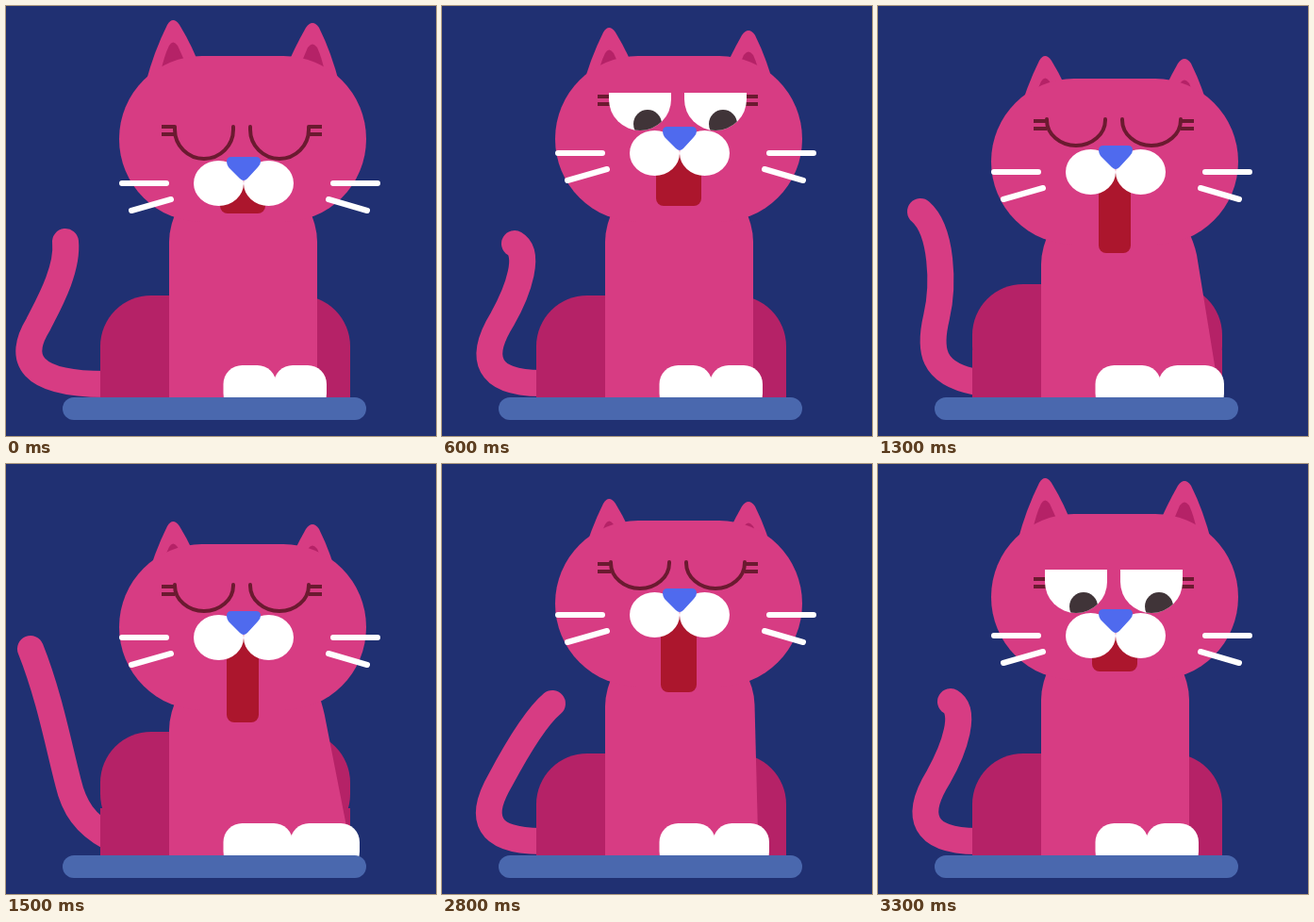
Write an HTML page without scripts that moves like this. It is 456 px wide and 456 px high and loops after 3400 ms.

```html
<!DOCTYPE html>
<html lang="en">
<head>
<meta charset="utf-8">
<title>Yawning cat</title>
<style>
  @property --ear   { syntax: "<length>"; inherits: true; initial-value: 0px; }
  @property --head  { syntax: "<length>"; inherits: true; initial-value: 0px; }
  @property --face  { syntax: "<length>"; inherits: true; initial-value: 0px; }
  @property --body  { syntax: "<length>"; inherits: true; initial-value: 0px; }
  @property --jaw   { syntax: "<length>"; inherits: true; initial-value: 30px; }
  @property --mouth { syntax: "<length>"; inherits: true; initial-value: 24px; }
  @property --paw   { syntax: "<length>"; inherits: true; initial-value: 55px; }
  @property --lash  { syntax: "<length>"; inherits: true; initial-value: 0px; }
  @property --lid   { syntax: "<length>"; inherits: true; initial-value: 0px; }

  html, body { margin: 0; height: 100%; overflow: hidden; background: #203072; }
  svg { display: block; width: 100vw; height: 100vh; }

  svg, .tail, .torso, .open, .shut, .shut path {
    animation: 3.4s step-end infinite;
  }
  svg { animation-name: pose; }
  .tail { animation-name: tail; }
  .torso { animation-name: torso; }
  .open { animation-name: open; }
  .shut { animation-name: shut; }
  .shut path { animation-name: squeeze; }

  .pink { fill: #d73c83; }
  .dark { fill: #b52267; }
  .white { fill: #fff; }
  .line { fill: none; stroke: #6b1a30; stroke-width: 4; }
  .whiskers { fill: none; stroke: #fff; stroke-width: 6; stroke-linecap: round; }
  .tail {
    --curl: path("M77 252C94 262 82 300 64 332C38 374 48 400 105 400");
    fill: none; stroke: #d73c83; stroke-width: 28; stroke-linecap: round;
  }
  .torso { --upright: path("M173 430V250Q173 232 184 210H319Q330 232 330 250L330 430Z"); }

  .ears { transform: translateY(var(--ear)); }
  .head { transform: translateY(var(--head)); }
  .face { transform: translateY(var(--face)); }
  .body { transform: translateY(var(--body)); }
  .lashes { transform: translateY(var(--lash)); }
  .lid { height: var(--lid); }
  .mouth { x: calc(251px - var(--mouth)); width: calc(2 * var(--mouth)); height: var(--jaw); }
  .paw { width: calc(var(--paw) + 1px); }
  .paw + .paw { x: calc(229px + var(--paw)); }

  /* the yawn plays forward, holds, then runs back */
  @keyframes pose {
    11.76%, 97.05% { --ear: 0px; --face: -6px; --jaw: 36px; --lid: 0px; }
    14.7%, 94.11% { --ear: 4px; --face: -19px; --jaw: 45px; --lid: 3px; }
    17.64% {
      --ear: 8px; --head: 0px; --face: -32px; --jaw: 54px; --mouth: 24px;
      --paw: 55px; --lash: 0px; --lid: 7px; animation-timing-function: steps(3);
    }
    26.47% {
      --ear: 22px; --head: 7px; --face: -28px; --jaw: 80px; --mouth: 19px;
      --paw: 58.5px; --lash: 6px; --lid: 46px; --body: 0px;
    }
    32.35%, 79.41% { --ear: 30px; --head: 15px; --face: -20px; --jaw: 82px; --mouth: 18px; --paw: 63.5px; --body: -4px; }
    38.23%, 73.52% { --ear: 38px; --head: 24px; --face: -12px; --jaw: 84px; --mouth: 17px; --paw: 68.5px; --body: -12px; }
    44.11% { --ear: 46px; --head: 32px; --face: -4px; --jaw: 88px; --mouth: 17px; --paw: 72.5px; --body: -23px; }
    82.35% {
      --ear: 22px; --head: 7px; --face: -28px; --jaw: 80px; --mouth: 19px;
      --paw: 58.5px; --lash: 6px; --lid: 46px; --body: 0px; animation-timing-function: steps(3);
    }
    91.17% {
      --ear: 8px; --head: 0px; --face: -32px; --jaw: 54px; --mouth: 24px;
      --paw: 55px; --lash: 0px; --lid: 7px;
    }
  }
  @keyframes tail {
    0% { d: path("M63 250C66 280 44 318 34 338C12 374 24 401 105 401"); animation-timing-function: steps(3); }
    8.82% { d: path("M55 257C80 264 68 303 53 332C27 374 40 400 105 400"); }
    11.76%, 91.17%, 100% { d: var(--curl); }
    17.64% { d: var(--curl); animation-timing-function: steps(3); }
    26.47% { d: path("M117 254C98 270 78 305 62 335C38 376 48 400 105 400"); }
    32.35%, 79.41% { d: path("M80 234C92 256 82 300 63 333C38 376 48 400 105 400"); }
    38.23%, 73.52% { d: path("M45 218C68 238 70 296 62 330C54 364 56 390 105 399"); }
    44.11% { d: path("M26 196C46 246 56 300 66 338C72 364 84 382 110 396"); }
    82.35% { d: path("M117 254C98 270 78 305 62 335C38 376 48 400 105 400"); animation-timing-function: steps(3); }
  }
  @keyframes torso {
    0%, 91.17%, 100% { d: var(--upright); }
    17.64% { d: var(--upright); animation-timing-function: steps(3); }
    26.47% { d: path("M173 430V257Q173 239 184 217H320Q331 237 331.5 255L336 430Z"); }
    32.35%, 79.41% { d: path("M173 430V265Q173 247 184 225H323Q333 243 335 260L352 430Z"); }
    38.23%, 73.52% { d: path("M173 430V274Q173 256 184 234H327Q335 250 338 264L365 430Z"); }
    44.11% { d: path("M173 430V282Q173 264 184 242H331Q337 260 339 272L370 430Z"); }
    82.35% { d: path("M173 430V257Q173 239 184 217H320Q331 237 331.5 255L336 430Z"); animation-timing-function: steps(3); }
  }
  @keyframes open {
    0%, 23.52% { visibility: hidden; }
    5.88%, 88.23%, 100% { visibility: visible; }
  }
  @keyframes shut {
    0%, 23.52% { visibility: visible; }
    5.88%, 88.23%, 100% { visibility: hidden; }
  }
  @keyframes squeeze {
    0% { d: path("M179 128V131A31 31 0 0 0 241 131V128"); }
    5.88%, 100% { d: path("M179 132V133A31 27 0 0 0 241 133V132"); }
  }
</style>
</head>
<body>
<svg viewBox="0 0 456 456">
  <defs>
    <clipPath id="socket"><path d="M177 118H243V131A33 33 0 0 1 177 131Z"/></clipPath>
    <g id="eye">
      <g clip-path="url(#socket)">
        <rect class="white" x="177" y="118" width="66" height="46"/>
        <circle cx="218" cy="157" r="15" fill="#403438"/>
      </g>
      <rect class="lid pink" x="176.5" y="117" width="67"/>
    </g>
  </defs>

  <path class="tail" d="M63 250C66 280 44 318 34 338C12 374 24 401 105 401"/>
  <rect class="body dark" x="100" y="307" width="265" height="120" rx="54"/>
  <rect class="dark" x="100" y="365" width="265" height="60"/>
  <path class="torso pink" d="M173 430V250Q173 232 184 210H319Q330 232 330 250L330 430Z"/>
  <g class="white">
    <rect class="paw" x="230.5" y="381" height="50" rx="20"/>
    <rect class="paw" y="381" height="50" rx="20"/>
  </g>
  <rect x="60" y="415" width="322" height="24" rx="12" fill="#4a68ae"/>

  <g class="ears">
    <path class="pink" d="M148 82Q157 48 171 20Q177 10 184 20Q198 43 207 68Z"/>
    <path class="pink" d="M296 68Q306 44 318 23Q325 13 332 23Q345 49 354 84Z"/>
    <path class="dark" d="M164 70Q168 52 173 42Q177 35 182 42L191 62Z"/>
    <path class="dark" d="M312 63L320 44Q325 37 330 44Q335 55 338 70Z"/>
  </g>
  <rect class="head pink" x="120" y="53" width="262" height="176" rx="88"/>

  <g class="face">
    <path class="lashes line" d="M165 128H179M165 136H179M321 128H335M321 136H335"/>
    <g class="open">
      <use href="#eye"/>
      <use href="#eye" x="80"/>
    </g>
    <g class="shut line" stroke-linecap="round">
      <path d="M179 128V131A31 31 0 0 0 241 131V128"/>
      <path d="M179 128V131A31 31 0 0 0 241 131V128" transform="translate(80)"/>
    </g>
    <rect class="mouth" y="190" rx="8" fill="#ac162d"/>
    <g class="white">
      <ellipse cx="225.5" cy="188" rx="26.5" ry="24"/>
      <ellipse cx="278.5" cy="188" rx="26.5" ry="24"/>
    </g>
    <path fill="#4f6aee" d="M239 160H265Q270 160 270 165Q270 168 267 171L256 183Q252 187 248 183L236 171Q234 168 234 165Q234 160 239 160Z"/>
    <path class="whiskers" d="M123 188H170M133 217L175 205M347 188H394M342 205L383 217"/>
  </g>
</svg>
</body>
</html>
```
